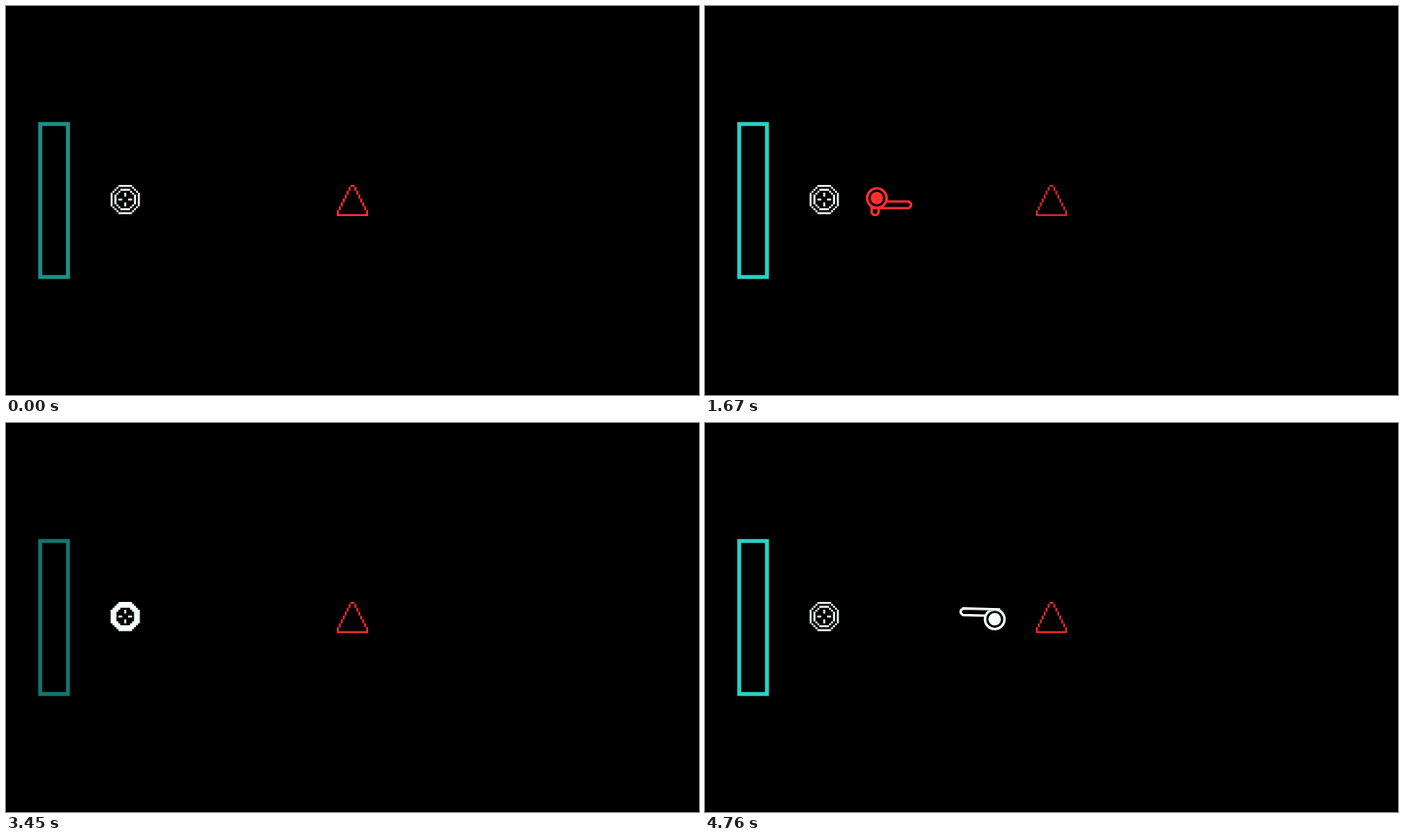
Recreate the animation shown at these times as an HTML page with a canvas. Size 800 by 450 pixels, loop 4790 ms.

```html
<!DOCTYPE html>
<html>
<head>
<meta charset="utf-8">
<style>
html, body { margin: 0; width: 100%; height: 100%; overflow: hidden; background: #000; }
canvas { display: block; }
</style>
</head>
<body>
<canvas id="stage" width="800" height="450"></canvas>
<script>
const ctx = document.getElementById('stage').getContext('2d');
const LOOP = 4790, CELL = 2.25;
const RED = [255, 48, 48], TEAL = [41, 211, 200], WHITE = [245, 255, 253];
const SHOT = 60, CATCH = 2000, FIRE = 4230;

// Brightness keys: [time, level]
const BAR_GLOW = [[0, .69], [560, 1], [2450, 1], [3450, .55], [4120, .76], [4650, 1], [LOOP, 1]];
const TRIANGLE_GLOW = [[0, 1], [580, .79], [1670, .82], [2450, .87], [3450, .92], [4120, .98], [4760, .88], [LOOP, .88]];

function glow(keys, t) {
  const i = keys.findIndex(key => key[0] > t);
  const [t0, a] = keys[i - 1], [t1, b] = keys[i];
  const p = (t - t0) / (t1 - t0);
  return a + (b - a) * p * p * (3 - 2 * p);
}

function ink(color, level = 1) {
  ctx.fillStyle = ctx.strokeStyle = `rgb(${color.map(c => Math.round(c * level))})`;
}

function drawBar() {
  ctx.lineWidth = 4.5;
  ctx.strokeRect(39.5, 136.5, 32, 177);
}

// Adds a block of cells to the current path
function cells(x, y, col, row, w = 1, h = 1) {
  ctx.rect(x + col * CELL, y + row * CELL, w * CELL, h * CELL);
}

function drawTriangle() {
  const x = 382, y = 207;
  ctx.beginPath();
  cells(x, y, 7, 0, 2);
  for (let k = 1; k < 8; k++) {
    cells(x, y, 7 - k, 2 * k - 1, 1, 2);
    cells(x, y, 8 + k, 2 * k - 1, 1, 2);
  }
  cells(x, y, 0, 15, 16);
  ctx.fill();
}

function drawRing(loaded) {
  ctx.beginPath();
  for (let row = 0; row < 15; row++) {
    for (let col = 0; col < 15; col++) {
      const dx = Math.abs(col - 7), dy = Math.abs(row - 7);
      const far = Math.max(dx, dy), near = Math.min(dx, dy), sum = dx + dy;
      const inside = sum <= 10;
      const outer = inside && (far === 7 || sum === 10);
      const inner = far <= 5 && sum <= 7 && (far === 5 || sum === 7);
      const band = inside && (far >= 5 || sum >= 7);
      const cross = near === 0 && (far === 2 || far === 3);
      if (outer || inner || cross || (loaded && band)) cells(120.75, 207, col, row);
    }
  }
  ctx.fill();
}

// Ball with a long tail, centred on the ball and flying to the left at angle 0
function drawBolt(x, y, angle, foot) {
  ctx.save();
  ctx.translate(x, y);
  ctx.rotate(angle);
  ctx.lineWidth = 2.8;
  ctx.lineJoin = 'round';
  ctx.beginPath();
  ctx.arc(0, 0, 7.2, 0, 2 * Math.PI);
  ctx.fill();
  ctx.beginPath();
  ctx.arc(0, 0, 11.3, 0, 2 * Math.PI);
  ctx.moveTo(10.5, 4);
  ctx.lineTo(37, 4);
  ctx.lineTo(39.5, 6.5);
  ctx.lineTo(39.5, 9);
  ctx.lineTo(37, 11.6);
  ctx.lineTo(-6, 11.6);
  if (foot) {
    ctx.moveTo(-6, 9);
    ctx.lineTo(-6, 17);
    ctx.lineTo(-3.5, 19.5);
    ctx.lineTo(-.5, 19.5);
    ctx.lineTo(2, 17);
    ctx.lineTo(2, 11.6);
  }
  ctx.stroke();
  ctx.restore();
}

function draw(t) {
  ctx.fillStyle = '#000';
  ctx.fillRect(0, 0, 800, 450);
  ink(TEAL, glow(BAR_GLOW, t));
  drawBar();
  ink(WHITE);
  drawRing(t >= CATCH && t < FIRE);
  ink(RED, glow(TRIANGLE_GLOW, t));
  drawTriangle();
  if (t >= SHOT && t < CATCH) {
    const way = (t - SHOT) * .1234;
    ink(RED);
    drawBolt(397.2 - way, 223.4 - way * .006, 0, true);
  }
  if (t >= FIRE) {
    const way = (t - FIRE) * .37;
    ink(WHITE);
    drawBolt(138 + way, 223.9 + way * .016, Math.PI + .025, false);
  }
}

const start = performance.now();
function tick() {
  draw((performance.now() - start) % LOOP);
  requestAnimationFrame(tick);
}
tick();
</script>
</body>
</html>
```
